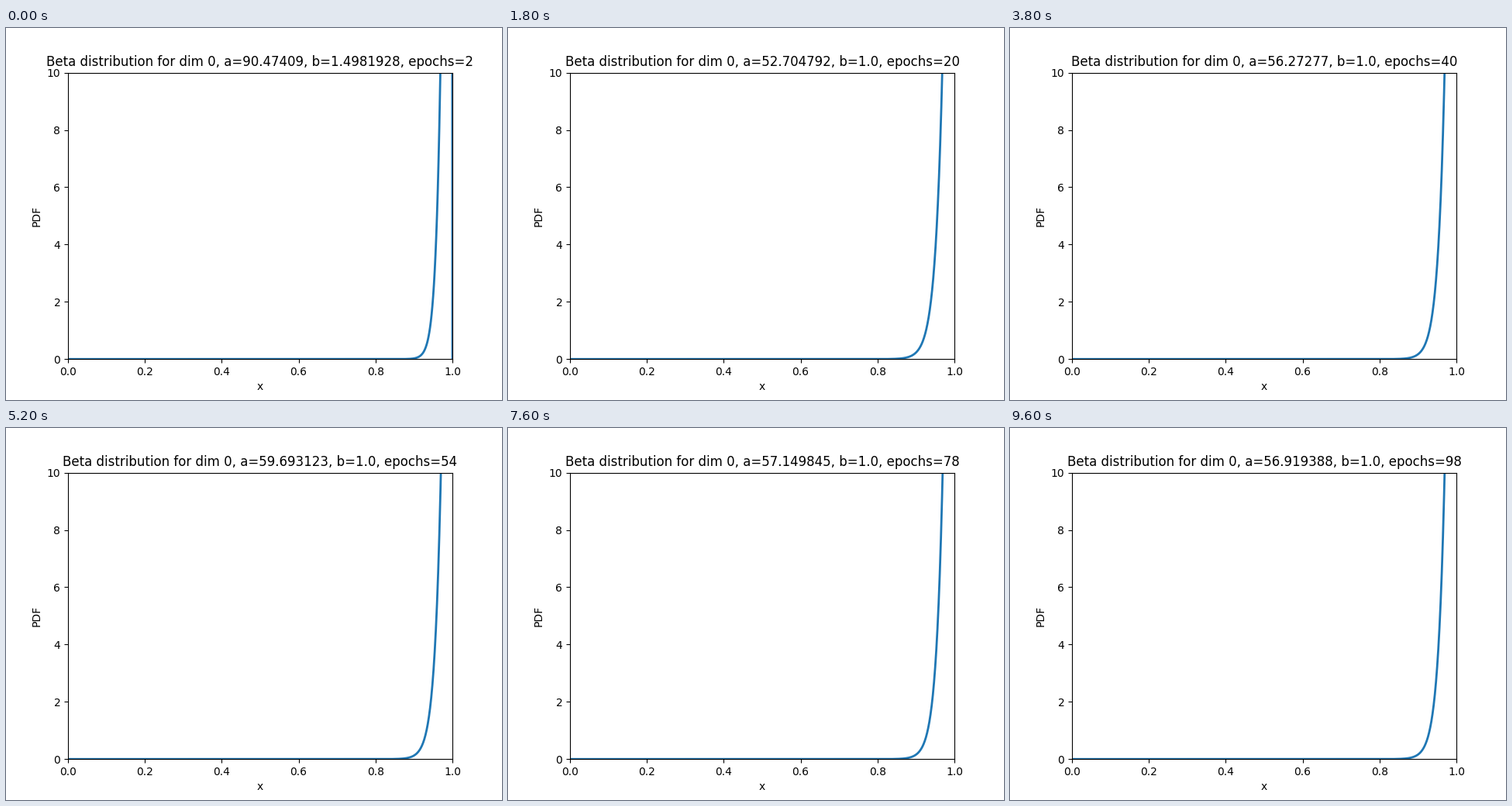
A matplotlib script for the animation above (9800 ms loop, 640 by 480 pixels).

```python
import math

import matplotlib.pyplot as plt
import numpy as np
from matplotlib.animation import FuncAnimation

FRAMES = 49
INTERVAL = 200

# Key points (epoch, a) of the fitted parameter
A_KEYS = [(2, 90.47409), (12, 52.068546), (28, 53.341038), (54, 59.693123),
          (68, 57.766464), (88, 56.53323), (98, 56.919388)]
B_START = 1.4981928

x = np.linspace(0, 1, 1000)


def shape_params(epoch):
    a = np.interp(epoch, *zip(*A_KEYS))
    # b falls steadily until it is held at its lower bound
    b = max(1, B_START - (epoch - 2) / 16)
    return np.float32(a), np.float32(b)


def beta_pdf(a, b):
    log_norm = math.lgamma(a + b) - math.lgamma(a) - math.lgamma(b)
    return math.exp(log_norm) * x ** (a - 1) * (1 - x) ** (b - 1)


fig, ax = plt.subplots(figsize=(6.4, 4.8), dpi=100)
line, = ax.plot([], [], lw=2)
ax.set(xlim=(0, 1), ylim=(0, 10), xlabel="x", ylabel="PDF")
title = ax.set_title("")


def update(frame):
    epoch = 2 * (frame + 1)
    a, b = shape_params(epoch)
    line.set_data(x, beta_pdf(float(a), float(b)))
    title.set_text("Beta distribution for dim 0, "
                   f"a={str(a)}, b={str(b)}, epochs={epoch}")
    return line, title


anim = FuncAnimation(fig, update, frames=FRAMES, interval=INTERVAL,
                     repeat=True, repeat_delay=0, blit=False)
plt.show()
```
